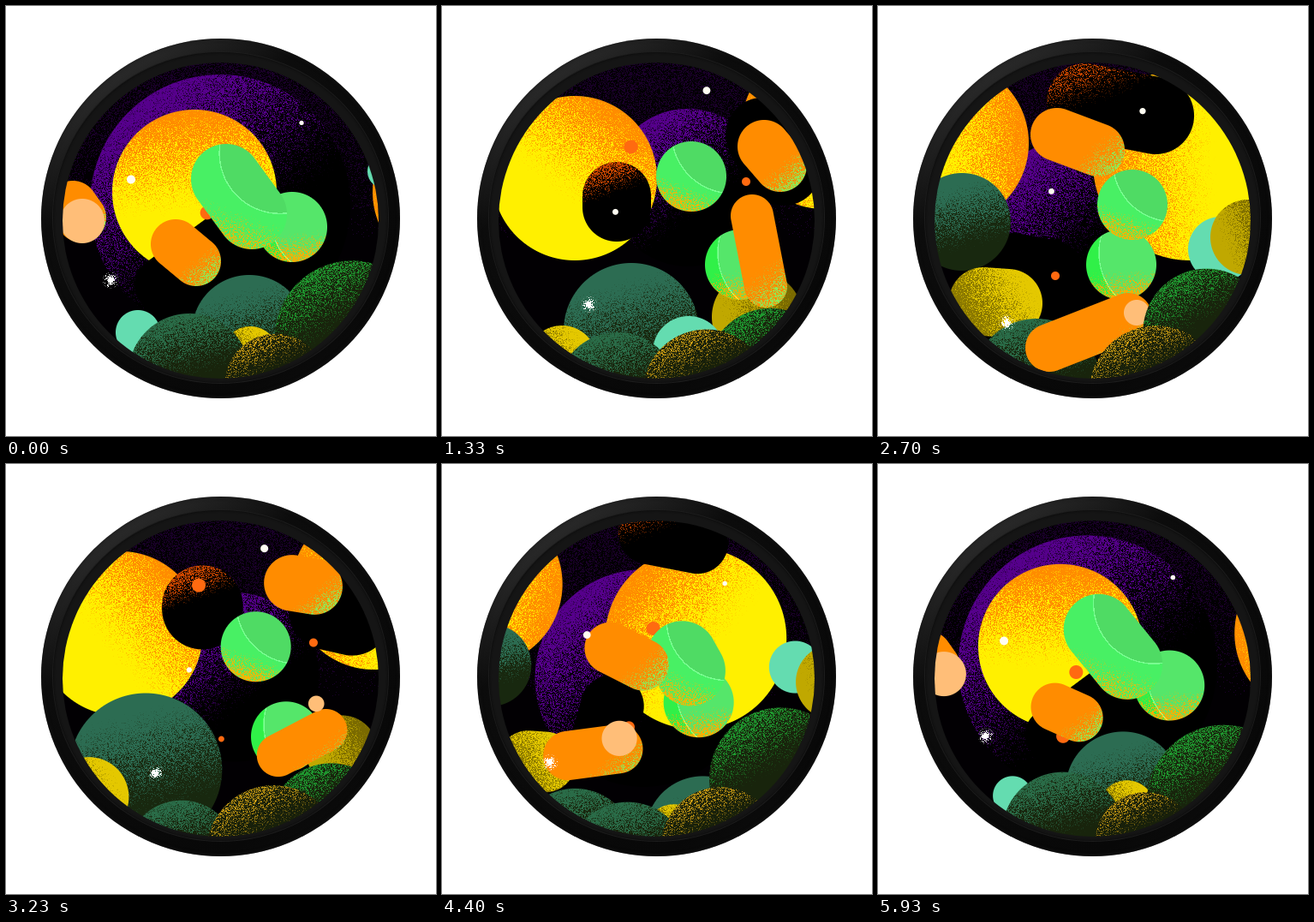
An HTML page with a canvas for the animation above (6010 ms loop, 502 px wide and 502 px high).

```html
<!DOCTYPE html>
<html lang="en">
<head>
<meta charset="utf-8">
<title>Porthole</title>
<style>
  html, body { margin: 0; width: 100%; height: 100%; overflow: hidden; background: #fff; }
  .rim { position: absolute; border-radius: 50%; }
  #outer { left: 41px; top: 38px; width: 419px; height: 420px;
    background: linear-gradient(145deg, #343434 8%, #0c0c0c 32%, #080808 80%, #121212);
    box-shadow: inset 0 0 5px #161616; }
  #inner { left: 55px; top: 54px; width: 391px; height: 386px;
    background: #151515; box-shadow: 0 0 0 1px #1d1d1d, inset 0 0 3px #080808; }
  canvas { position: absolute; left: 66px; top: 66px; border-radius: 50%; }
</style>
</head>
<body>
<div id="outer" class="rim"></div>
<div id="inner" class="rim"></div>
<canvas id="view" width="369" height="369"></canvas>
<script>
const SIZE = 369, OFF = 66, CYCLE = 26, LOOP = 6010;
const ctx = document.getElementById('view').getContext('2d');
const img = ctx.createImageData(SIZE, SIZE);
const px = img.data;

// Fixed grain for all stippled shading
let seed = 20117;
const grain = Float32Array.from({ length: SIZE * SIZE }, () => {
  seed = (Math.imul(seed, 1664525) + 1013904223) >>> 0;
  return seed / 4294967296;
});

const clamp = v => v < 0 ? 0 : v > 1 ? 1 : v;
const rgb = hex => [1, 3, 5].map(i => parseInt(hex.slice(i, i + 2), 16));

// Every trail passes its points at the same five steps of a cycle
const STOPS = [0, 9, 14, 17, 23];
const stopAt = i => {
  const turn = Math.floor(i / STOPS.length);
  return turn * CYCLE + STOPS[i - turn * STOPS.length];
};

// Points: [x, y, radius, dx, dy]; dx, dy lead to the other end of a pod
function trail(start, radius, points) {
  const pts = points.map(([x, y, r = radius, dx = 0, dy = 0]) => [x, y, r, dx, dy]);
  const slope = (i, c) => (pts[i + 1][c] - pts[i][c]) / (stopAt(start + i + 1) - stopAt(start + i));
  // Harmonic mean of both sides keeps the curve from overshooting
  const tangent = (i, c) => {
    if (i === 0) return slope(0, c);
    if (i === pts.length - 1) return slope(i - 1, c);
    const a = slope(i - 1, c), b = slope(i, c);
    return a * b > 0 ? 2 * a * b / (a + b) : 0;
  };
  return k => {
    let i = 0;
    while (i < pts.length - 2 && stopAt(start + i + 1) <= k) i++;
    const from = stopAt(start + i), span = stopAt(start + i + 1) - from;
    const t = (k - from) / span;
    if (t < 0 || t > 1) return null;
    const ease = t * t * (3 - 2 * t);
    return pts[i].map((v, c) => v + (pts[i + 1][c] - v) * ease
      + span * t * (1 - t) * ((1 - t) * tangent(i, c) - t * tangent(i + 1, c)));
  };
}

function ring(radius, points) {
  const run = trail(-1, radius, [...points.slice(-1), ...points, ...points.slice(0, 2)]);
  return k => k < 0 || k >= CYCLE ? null : run(k);
}

// Waves: [mean, swing, step of the peak]
function orbit(...waves) {
  const wave = ([mean, swing = 0, peak = 0], k) =>
    mean + swing * Math.cos((k - peak) / CYCLE * 2 * Math.PI);
  return k => k < 0 || k >= CYCLE ? null : [...waves.map(w => wave(w, k)), 0, 0];
}

const part = (colors, pose, look = {}) =>
  ({ ang: () => 0, from: 0, to: 1, ...look, colors: colors.split(' ').map(rgb), pose });
const lit = (ang, from, to, more) =>
  ({ ang: typeof ang === 'number' ? () => ang : ang, from, to, ...more });

const parts = [
  part('#56008c #000000', ring(152, [[250, 232], [225, 263, 106], [255, 262, 102],
    [287, 212, 92], [230, 242, 146]]), lit(52, -1.2, .35)),

  // Moons: the orange side turns as they cross
  part('#fff000 #ff8c00', trail(0, 96, [[0, 118], [80, 160], [123, 195], [155, 201],
    [202, 201], [220, 217], [364, 184, 113], [420, 147], [446, 141], [488, 150],
    [524, 217], [600, 250]]), lit(x => Math.max(-180, -.63 * (x - 70)), -.3, 1.15)),

  // Shadows
  part('#000000 #d04800', trail(0, 45, [[240, 40, 20], [242, 112, 45, 82, 16],
    [239, 143, 49], [204, 222, 40, 0, 13], [288, 258, 24]]), lit(-110, .15, 1.3)),
  part('#000000', trail(-1, 34, [[288, 258, 24, -20, 20], [268, 264, 33, -85, 62],
    [158, 303, 38, 44, 8], [150, 340, 0]])),
  part('#000000', trail(1, 45, [[335, 150, 20], [375, 180, 45, 30, -5], [374, 150, 43, 25, 40],
    [470, 230, 30], [470, 215, 30]])),

  // Embers
  part('#ff6a10', orbit([233, 14, 6], [185, 58, 25], [8])),
  part('#ff6a10', ring(5, [[234, 296, 8], [207, 315], [256, 313, 3], [230, 350], [165, 380, 8]])),
  part('#ff6a10', trail(2, 5, [[361, 211], [355, 205], [346, 205]])),

  part('#64dcb0', trail(-1, 20, [[460, 180], [442, 193], [400, 284, 38], [430, 360, 38]])),
  part('#c0a800 #7a6a00', trail(0, 44, [[490, 240], [432, 270], [405, 323, 38],
    [368, 363, 53], [430, 460]]), lit(-20, -.8, 1)),

  // Green balls
  part('#30f048 #ffae00 #55e66a', ring(41, [[334, 258], [284, 302], [315, 322], [348, 302],
    [349, 262]]), lit(85, .1, 1.3, { seam: [1.15, -.35, 1.8] })),
  part('#48f064 #ffb400 #4fdb64', ring(41, [[257, 202, 41, 30, 41], [297, 232], [292, 219],
    [291, 199], [262, 175, 41, 38, 41]]), lit(110, .2, 1.3, { seam: [1.15, -1.25, 1.72] })),

  // Back hills
  part('#2c6c52 #18280f', trail(0, 67, [[0, 220, 40], [98, 252, 57], [140, 340, 92],
    [221, 379, 79], [292, 378], [284, 381], [330, 490]]), lit(75, -.8, .6)),
  part('#e4c800 #8a7800', trail(0, 33, [[50, 350, 30], [123, 345, 40, 29, 2], [88, 375, 48],
    [140, 414, 41], [300, 396], [285, 407], [260, 450]]), lit(150, -.9, 1)),
  part('#64dcb0', trail(2, 26, [[340, 440, 42], [288, 404, 42], [172, 405, 14], [154, 381],
    [150, 450]])),
  part('#2a6c48 #18240c', trail(0, 71, [[110, 470, 60], [185, 440, 75], [205, 458, 62],
    [205, 452], [221, 434], [214, 430], [220, 510]]), lit(75, -1.2, .1)),

  // Orange pods
  part('#ff8c00 #8cec58', trail(-1, 29, [[10, 210, 29, 8, 8], [78, 233, 29, 10, 14],
    [200, 399, 28, 92, -36], [290, 378, 25, 70, -68], [362, 245, 25, 16, 82],
    [284, 287, 26, -39, 19], [222, 298, 29, -24, -20], [257, 168, 31, -48, -18],
    [342, 131, 33, -30, 2], [395, 186, 31, -19, -22], [470, 225, 12]]), lit(50, .2, 1.4)),
  part('#ffbe78', trail(-1, 26, [[58, 236], [89, 251], [302, 358, 15], [365, 297, 12],
    [350, 240, 0]])),

  // Front hills
  part('#18240c #1f9a30', orbit([391, 13], [398, 30, 18], [80, 10]), lit(-120, .1, 1.6)),
  part('#18200a #c89a14', orbit([316, 10, 7], [448, 6, 13], [70, 11, 12]), lit(-115, .2, 1.7)),

  // Stars
  part('#fffdf2', orbit([322, 23], [120, 22, 3], [3.5, 1, 15])),
  part('#fffdf2', orbit([182, 36, 13], [219, 22, 16], [4, 1])),
  part('#ffffff', orbit([147, 28, 15], [345, 28, 11], [9]), { halo: true }),
];

function paint({ colors, ang, from, to, seam, halo }, [gx, gy, r, dx, dy]) {
  if (r <= .3) return;
  const [base, speck, panel] = colors;
  const x0 = gx - OFF, y0 = gy - OFF, len2 = dx * dx + dy * dy;
  const cx = x0 + dx / 2, cy = y0 + dy / 2, reach = r + Math.sqrt(len2) / 2;
  const turn = ang(gx) * Math.PI / 180;
  const ux = Math.cos(turn) / reach, uy = Math.sin(turn) / reach;
  const low = (v, d) => Math.max(0, Math.floor(Math.min(v, v + d) - r - 1));
  const high = (v, d) => Math.min(SIZE - 1, Math.ceil(Math.max(v, v + d) + r + 1));
  const right = high(x0, dx), bottom = high(y0, dy);
  for (let y = low(y0, dy); y <= bottom; y++) {
    for (let x = low(x0, dx); x <= right; x++) {
      const ex = x + .5 - x0, ey = y + .5 - y0;
      const h = len2 > .01 ? clamp((ex * dx + ey * dy) / len2) : 0;
      const d = Math.hypot(ex - h * dx, ey - h * dy);
      const cover = clamp(r - d + .5);
      if (!cover) continue;
      const n = y * SIZE + x, g = grain[n];
      if (halo && g > 1.5 * (1 - d / r) ** 1.5) continue;
      let color = base, lift = 0, mix = 0;
      if (seam) {
        const s = Math.hypot(x - cx - seam[0] * r, y - cy - seam[1] * r) - seam[2] * r;
        if (s < 0) color = panel;
        if (Math.abs(s) < .7) lift = 45;
      }
      if (speck) {
        const u = (x - cx) * ux + (y - cy) * uy;
        const p = clamp((u - from) / (to - from)) * 1.4 - .2;
        mix = clamp(.5 + (p - g) * 2.5);
      }
      for (let c = 0; c < 3; c++) {
        const o = n * 4 + c;
        const tone = mix ? color[c] + (speck[c] - color[c]) * mix : color[c];
        px[o] += (Math.min(255, tone + lift) - px[o]) * cover;
      }
    }
  }
}

function draw(step) {
  for (let n = 0; n < grain.length; n++) {
    const on = grain[n] < .5 - n / SIZE / 420;
    px.set(on ? [25, 0, 40, 255] : [2, 0, 3, 255], n * 4);
  }
  for (const p of parts) {
    for (let turn = -1; turn <= 2; turn++) {
      const pose = p.pose(step + turn * CYCLE);
      if (pose) paint(p, pose);
    }
  }
  ctx.putImageData(img, 0, 0);
}

// Three turns of two seconds, with short rests at 0 and 700 ms
function stepAt(ms) {
  const t = ms % LOOP;
  const turn = t - 2000 * Math.min(2, Math.floor(t / 2000));
  const run = (start, pace, first, last) =>
    Math.min(last, first + Math.floor((turn - start) / pace + 1e-6));
  if (turn < 100) return 0;
  if (turn < 800) return run(100, 75, 1, 9);
  if (turn < 1470) return run(800, 75, 10, 18);
  if (turn < 1800) return run(1470, 82.5, 19, 22);
  return run(1800, 65, 23, 25);
}

const start = performance.now();
let shown = -1;
function tick() {
  const step = stepAt(performance.now() - start);
  if (step !== shown) draw(shown = step);
  requestAnimationFrame(tick);
}
tick();
</script>
</body>
</html>
```
